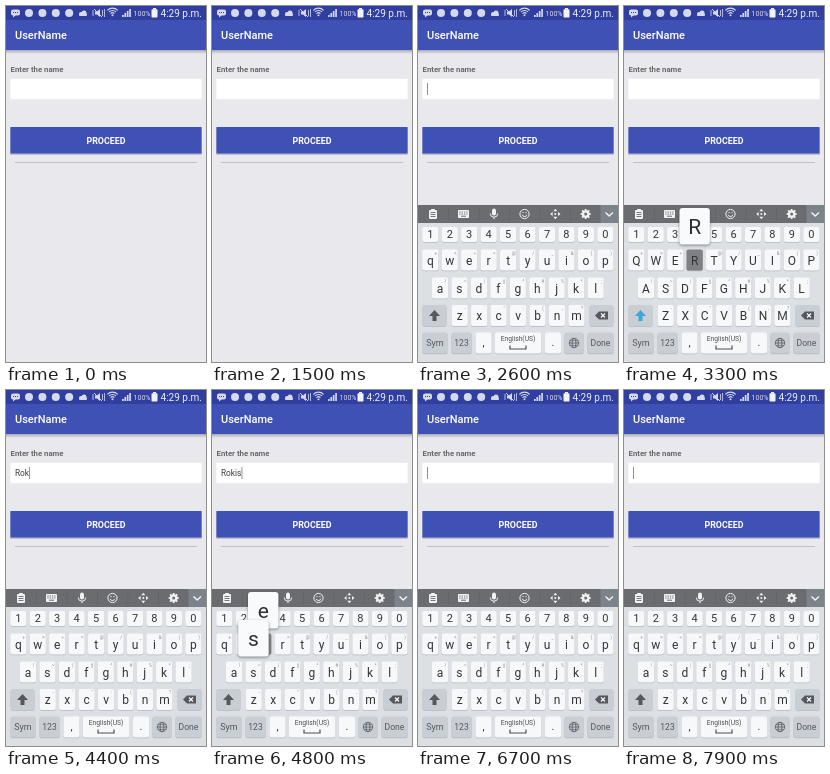
Write an HTML page with a canvas that moves like this. It is 200 by 356 pixels and loops after 8000 ms.

```html
<!DOCTYPE html>
<html lang="en">
<head>
<meta charset="utf-8">
<title>Name form</title>
<style>
html, body { margin: 0; width: 100%; height: 100%; overflow: hidden; background: #e9e8ec; }
canvas { display: block; width: 200px; height: 356px; }
</style>
</head>
<body>
<canvas id="stage"></canvas>
<script>
const W = 200, H = 356, LOOP = 8000;
const canvas = document.getElementById('stage');
const ctx = canvas.getContext('2d');
const scale = window.devicePixelRatio || 1;
canvas.width = W * scale;
canvas.height = H * scale;

const NAME = 'Rokisemanuda';
const PRESSES = [3300, 3400, 4200, 4500, 4700, 4800, 5100, 5200, 5300, 5380, 5440, 5500];
const SUBMIT = 6600;
const CURSOR_ON = [[600, 1100], [2600, 3100], [3400, 4000], [4200, 6100], [6700, 7200], [7600, 8000]];

const ROWS = [
  { keys: '1234567890', x: 12.3, y: 228.5, h: 15, hints: '' },
  { keys: 'qwertyuiop', x: 12.3, y: 254, h: 21, hints: '+×÷=@/_&()' },
  { keys: 'asdfghjkl', x: 22, y: 282, h: 21, hints: "!~|$^#%*;" },
  { keys: 'zxcvbnm', x: 41.7, y: 309.5, h: 21, hints: '-\'":(,?' }
];
const PITCH = 19.45;

const within = (t, [a, b]) => t >= a && t < b;

function box(x, y, w, h, color, r = 0) {
  ctx.fillStyle = color;
  ctx.beginPath();
  ctx.roundRect(x, y, w, h, r);
  ctx.fill();
}

function label(str, x, y, size, color, weight = 400, align = 'center') {
  ctx.font = `${weight} ${size}px Roboto, sans-serif`;
  ctx.fillStyle = color;
  ctx.textAlign = align;
  ctx.fillText(str, x, y);
}

function line(points, color, width = 1, close = false) {
  ctx.beginPath();
  points.forEach(([x, y]) => ctx.lineTo(x, y));
  if (close) ctx.closePath();
  ctx.strokeStyle = color;
  ctx.lineWidth = width;
  ctx.stroke();
}

function shape(points, color) {
  ctx.beginPath();
  points.forEach(([x, y]) => ctx.lineTo(x, y));
  ctx.fillStyle = color;
  ctx.fill();
}

function disc(x, y, r, color) {
  ctx.fillStyle = color;
  ctx.beginPath();
  ctx.arc(x, y, r, 0, 7);
  ctx.fill();
}

function arc(x, y, r, from, to, color, width = 1) {
  ctx.beginPath();
  ctx.arc(x, y, r, from, to);
  ctx.strokeStyle = color;
  ctx.lineWidth = width;
  ctx.stroke();
}

function drawStatusBar() {
  const ink = '#d5d9ee', bar = '#303f9f';
  box(0, 0, W, 14, bar);
  box(5, 3.5, 9, 6, ink, 2);
  shape([[7, 9], [10, 9], [7, 11.5]], ink);
  for (let i = 0; i < 3; i++) box(7 + i * 2, 6, 1, 1, bar);
  for (let i = 0; i < 4; i++) disc(23 + i * 13.4, 7, 4, ink);
  // cloud
  disc(75, 8, 2, ink);
  disc(78, 7, 2.5, ink);
  box(73, 7.5, 8, 2.5, ink, 1);
  // muted speaker
  shape([[89, 5.5], [91, 5.5], [94, 3], [94, 11], [91, 8.5], [89, 8.5]], ink);
  line([[88, 3], [96, 11]], ink, 1);
  line([[87, 4], [87, 10]], ink, .8);
  line([[96.5, 4], [96.5, 10]], ink, .8);
  line([[98.5, 3], [98.5, 11]], ink, .8);
  // wireless and signal strength
  for (const r of [2.7, 5, 7.3]) arc(106.5, 9.5, r, -2.35, -.79, ink, 1.2);
  disc(106.5, 9.3, 1, ink);
  for (let i = 0; i < 4; i++) box(116 + i * 2.4, 9 - i * 2, 1.7, 2 + i * 2, ink);
  label('100%', 136, 9.6, 7, ink);
  box(145.5, 3.2, 6, 8.3, '#f3f4fa', .7);
  box(147, 2, 3, 1.5, '#f3f4fa');
  label('4:29 p.m.', 196, 10.8, 10, '#eceef8', 400, 'right');
}

function drawForm(t) {
  box(0, 0, W, H, '#e9e8ec');
  const shade = ctx.createLinearGradient(0, 44, 0, 48);
  shade.addColorStop(0, '#a9aab8');
  shade.addColorStop(1, '#e9e8ec');
  box(0, 44, W, 4, shade);
  box(0, 14, W, 30, '#3f51b5');
  drawStatusBar();
  label('UserName', 9, 33, 11, '#fff', 500, 'left');
  label('Enter the name', 4.5, 66, 7.8, '#69696c', 700, 'left');
  box(4, 72.5, 192, 21, '#f2f1f3');
  box(4.5, 73, 191, 20, '#fff');

  const typed = t < SUBMIT ? NAME.slice(0, PRESSES.filter(p => t >= p + 100).length) : '';
  label(typed, 9, 86, 8.3, '#3c3c3e', 400, 'left');
  if (CURSOR_ON.some(span => within(t, span))) {
    box(9.2 + ctx.measureText(typed).width, 77, .8, 12, '#77777a');
  }

  box(4, 121, 192, 27.8, '#b5b8cd', 1);
  box(4.5, 121, 191, 26.6, within(t, [6500, 6700]) ? '#5565bd' : '#3f51b5', .5);
  label('PROCEED', 100, 137.7, 8.9, '#fff', 700);
  box(9, 156, 182, 1, '#c2c2c5');
}

function drawToolbar(t) {
  const ink = '#f2f2f3', bar = '#6b6c70';
  box(0, 199, W, 18, bar);
  box(182.5, 199, 17.5, 18, within(t, [7800, 7900]) ? '#5b6066' : '#7d838b');
  for (let i = 1; i < 6; i++) box(i * 30.4, 201, .6, 14, '#5f6064');
  // clipboard
  box(11, 204, 8, 9, ink, 1);
  box(13, 203, 4, 2, ink, .5);
  for (let i = 0; i < 3; i++) box(12.5, 206 + i * 2, 5, .9, bar);
  // keyboard
  box(40, 204, 11, 8, ink, .8);
  for (let i = 0; i < 8; i++) box(41.3 + i % 4 * 2.3, 205.5 + (i >> 2) * 2, 1.3, 1, bar);
  box(43, 209.7, 5, 1, bar);
  // microphone
  box(74, 202.5, 4, 7, ink, 2);
  arc(76, 207.5, 3.7, 0, Math.PI, ink);
  box(75.5, 211, 1, 2.3, ink);
  // smiley
  arc(106.5, 208, 4.6, 0, 7, ink);
  disc(105, 206.6, .7, ink);
  disc(108, 206.6, .7, ink);
  arc(106.5, 208.3, 2.3, .2, 2.94, ink, .9);
  // four arrows
  for (let i = 0; i < 4; i++) {
    ctx.save();
    ctx.translate(137.3, 208);
    ctx.rotate(i * Math.PI / 2);
    shape([[5.2, 0], [2.7, -2], [2.7, 2]], ink);
    ctx.restore();
  }
  disc(137.3, 208, 1, ink);
  // gear
  for (let i = 0; i < 8; i++) {
    const a = i * Math.PI / 4;
    line([[167.7, 208], [167.7 + 5 * Math.cos(a), 208 + 5 * Math.sin(a)]], ink, 1.8);
  }
  disc(167.7, 208, 3.8, ink);
  disc(167.7, 208, 1.5, bar);
  line([[187.5, 206.5], [191.2, 210], [195, 206.5]], ink, 1.5);
}

function keyCap(x, y, w, h, color) {
  box(x - w / 2, y - h / 2 + .8, w, h, '#b3b8be', 2);
  box(x - w / 2, y - h / 2, w, h, color, 2);
}

function drawFunctionKeys(upper) {
  const fn = '#c9ced4', plain = '#f7f8f9', ink = '#55585c';
  keyCap(16.5, 309.5, 24, 21, fn);
  shape([[16.5, 304], [22, 310], [18.5, 310], [18.5, 315], [14.5, 315], [14.5, 310], [11, 310]],
    upper ? '#3ba7dc' : ink);
  keyCap(183.5, 309.5, 24, 21, fn);
  shape([[177, 309.5], [181, 305.5], [190, 305.5], [190, 313.5], [181, 313.5]], ink);
  line([[183, 307.5], [187, 311.5]], '#fff', 1.1);
  line([[187, 307.5], [183, 311.5]], '#fff', 1.1);

  keyCap(17, 337, 25, 21, fn);
  label('Sym', 17, 340, 9, ink);
  keyCap(43.5, 337, 20, 21, fn);
  label('123', 43.5, 340, 8.5, ink);
  keyCap(65.5, 337, 16, 21, plain);
  label(',', 65.5, 340, 11, '#333');
  keyCap(100, 337, 46.5, 21, plain);
  label('English(US)', 100, 334.5, 6.7, '#4c4e51');
  line([[92, 339.5], [92, 343], [108, 343], [108, 339.5]], '#4c4e51', 1.2);
  keyCap(135, 337, 16, 21, plain);
  label('.', 135, 340, 11, '#333');
  keyCap(156, 337, 19, 21, fn);
  arc(156, 337, 4.7, 0, 7, ink, .8);
  ctx.beginPath();
  ctx.ellipse(156, 337, 2, 4.7, 0, 0, 7);
  ctx.stroke();
  line([[151.3, 337], [160.7, 337]], ink, .8);
  line([[152, 334.6], [160, 334.6]], ink, .6);
  line([[152, 339.4], [160, 339.4]], ink, .6);
  keyCap(182.5, 337, 26, 21, fn);
  label('Done', 182.5, 340, 8.6, ink);
}

function drawPopup(char, x, y) {
  ctx.save();
  ctx.shadowColor = 'rgba(40,45,55,.55)';
  ctx.shadowBlur = 3 * scale;
  ctx.shadowOffsetY = scale;
  box(x - 15.2, y - 52, 30.4, 36.5, '#f9fafb', 3);
  ctx.restore();
  label(char, x, y - 26.3, 21, '#2e2f31');
}

function drawKeyboard(t) {
  const upper = within(t, [3200, 3400]);
  box(0, 217, W, H, '#dce0e5');
  drawToolbar(t);
  const popups = [];
  for (const row of ROWS) {
    [...row.keys].forEach((key, i) => {
      const x = row.x + i * PITCH;
      const char = upper ? key.toUpperCase() : key;
      let held = false;
      PRESSES.forEach((p, n) => {
        if (NAME[n].toLowerCase() !== key || !within(t, [p, p + 200])) return;
        held = held || t < p + 100;
        popups.push([NAME[n], x, row.y]);
      });
      keyCap(x, row.y, 16.2, row.h, held ? '#7e8083' : '#f7f8f9');
      label(char, x, row.y + (row.hints ? 4.6 : 3.8), row.hints ? 12 : 11, '#333436');
      if (row.hints) label(row.hints[i], x + 5.6, row.y - 5.2, 4.5, '#8b8e92');
    });
  }
  drawFunctionKeys(upper);
  popups.forEach(p => drawPopup(...p));
}

// Fade and slide are composited through an offscreen layer.
const layer = document.createElement('canvas');
layer.width = canvas.width;
layer.height = canvas.height;

function drawScene(t) {
  ctx.setTransform(scale, 0, 0, scale, 0, 0);
  const shown = Math.min(1, Math.max(0, (t - 1500) / 500));
  if (shown > 0) {
    drawKeyboard(t);
    const copy = layer.getContext('2d');
    copy.clearRect(0, 0, layer.width, layer.height);
    copy.drawImage(canvas, 0, 0);
  }
  drawForm(t);
  if (shown > 0) {
    ctx.globalAlpha = shown;
    ctx.drawImage(layer, 0, 199 * scale, layer.width, 157 * scale,
      0, 199 + 40 * (1 - shown), W, 157);
    ctx.globalAlpha = 1;
  }
}

function tick() {
  const t = performance.now() % LOOP;
  drawScene(Math.floor(t / 100) * 100);
  requestAnimationFrame(tick);
}
tick();
</script>
</body>
</html>
```
